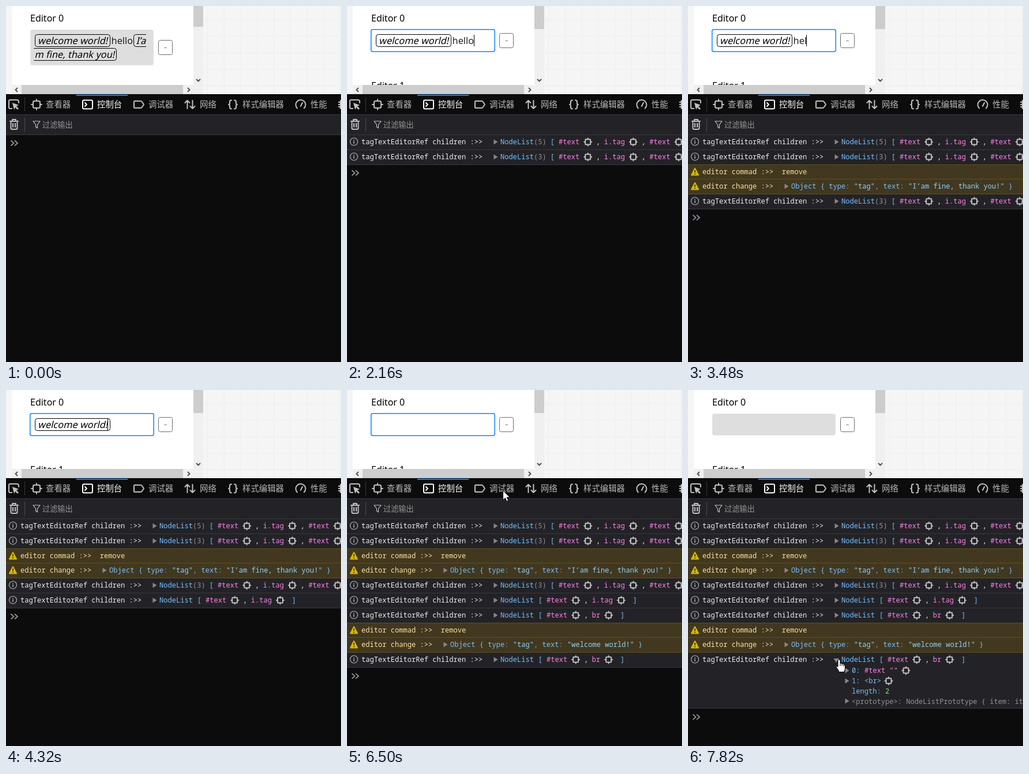
These frames come from a looping animation (581x618 px, 8 s). An HTML page:

```html
<!DOCTYPE html>
<html lang="zh">
<head>
<meta charset="utf-8">
<title>Tag editor and console</title>
<style>
  html, body { margin: 0; width: 100%; height: 100%; overflow: hidden; background: #0c0c0d; }
  svg { display: block; width: 581px; height: 618px; }
  text { white-space: pre; font-family: "Noto Sans", "Open Sans", sans-serif; font-size: 16.4px; }
  .label { font-size: 16px; }
  .cjk { font-family: "Noto Sans CJK SC", "Noto Sans CJK", sans-serif; font-size: 14.4px; }
  .filter { font-size: 13.2px; }
  .mono { font-family: "Noto Sans Mono", "DejaVu Sans Mono", monospace; font-size: 12.08px; font-weight: 500; }
  .icon { fill: none; stroke: #c0c0c3; stroke-width: 2; stroke-linejoin: round; stroke-linecap: round; }
  .active { stroke: #fff; }
  .thin { stroke-width: 1.2; }
  .tag { fill: none; stroke: #000; }
</style>
</head>
<body>
<svg id="stage" viewBox="0 0 581 618"></svg>
<script>
const LOOP = 8000, CHAR = 7.25;
const BLUE = '#75bfff', PINK = '#ff7de9', GREY = '#939395', LIGHT = '#ededf0', SAND = '#fce2a1', STRING = '#8fd0ff';

const escape = s => s.replace(/&/g, '&amp;').replace(/</g, '&lt;');
const text = (x, y, s, fill, cls = '') => `<text x="${x}" y="${y}" fill="${fill}" class="${cls}">${escape(s)}</text>`;
const rect = (x, y, w, h, fill, extra = '') => `<rect x="${x}" y="${y}" width="${w}" height="${h}" fill="${fill}" ${extra}/>`;
const path = (d, extra = 'class="icon"') => `<path d="${d}" ${extra}/>`;
const group = (id, body, extra = '') => `<g id="${id}" ${extra}>${body}</g>`;
const slanted = (x, y, s) => `<g transform="translate(${x} ${y}) skewX(-13)">${text(0, 0, s, '#000')}</g>`;

// ---------- web page ----------
function gridLines() {
  let d = '';
  for (let x = 349.5; x < 581; x += 28.8) d += `M${x} 0V153`;
  for (let y = 23.5; y < 153; y += 28.8) d += `M342 ${y}H581`;
  return path(d, 'stroke="#eeeeee"');
}

function page() {
  const chevron = 'fill="none" stroke="#505050" stroke-width="2"';
  return rect(0, 0, 581, 153, '#f5f5f5') + gridLines() + rect(10, 0, 315, 137, '#fff')
    + text(42, 27, 'Editor 0', '#000', 'label')
    + group('nextLabel', text(42, 144, 'Editor 1', '#000', 'label'), 'clip-path="url(#panel)"')
    + rect(42, 41, 214, 62, '#dedede', 'id="editor" rx="3"')
    + group('button', rect(264.5, -12.5, 24, 25, '#fff', 'rx="3" stroke="#6b6b6b"') + path('M274.5 .5H279', 'stroke="#777"'))
    + group('firstTag', rect(50.5, 49.5, 130, 21, 'none', 'class="tag" rx="4"') + slanted(55, 66, 'welcome world!'))
    + '<text id="plain" x="182.5" y="66" fill="#222"></text>'
    + group('secondTag', path('M243 49.5H225.5Q221.5 49.5 221.5 53.5V66.5Q221.5 70.5 225.5 70.5H243', 'class="tag"')
      + path('M48 73.5H187.5Q191.5 73.5 191.5 77.5V90.5Q191.5 94.5 187.5 94.5H48', 'class="tag"')
      + slanted(225.5, 66, 'I’a') + slanted(49.5, 90, 'm fine, thank you!'))
    + rect(0, 0, 1, 20, '#000', 'id="caret"')
    + rect(325, 0, 17, 153, '#f0f0f0') + rect(325, 0, 17, 36, '#cdcdcd', 'id="thumb"')
    + rect(10, 137, 315, 16, '#f0f0f0') + rect(27, 137, 280, 16, '#cdcdcd')
    + path('M330 127L333.5 130.5L337 127M20 142L16.5 145.5L20 149M315 142L318.5 145.5L315 149', chevron);
}

// ---------- developer tools ----------
const nodeIcon = (x, y) => `<g transform="translate(${x} ${y})">`
  + rect(-4.5, -4.5, 9, 9, 'none', 'class="icon" rx="1"')
  + path('M0-6.5V-5M0 6.5V5M-6.5 0H-5M6.5 0H5') + '</g>';

function toolbar() {
  const tabs = [[69, '查看器'], [158, '控制台'], [247, '调试器'], [336, '网络'], [410, '样式编辑器'], [528, '性能']];
  return rect(0, 153, 581, 465, '#0c0c0d') + rect(0, 189, 581, 34, '#232327')
    + path('M0 188.5H581M0 223.5H581M32.5 159V183', 'stroke="#38383d"')
    + path('M32.5 194V218', 'stroke="#4a4a4f"')
    + rect(122, 154, 89, 2, '#0a84ff')
    + tabs.map(([x, s]) => text(x, 176, s, x === 158 ? '#fff' : '#b8b8bb', 'cjk')).join('')
    + path('M10 178H7Q5 178 5 176V165Q5 163 7 163H19Q22 163 22 166V168')
    + path('M11 168L22 172L18 174L22 178L20 180L16 176L14 180Z', 'fill="#c0c0c3"')
    + rect(47, 165, 12, 12, 'none', 'class="icon" rx="2"') + path('M53 162V165M53 177V180M44 171H47M59 171H62')
    + rect(133, 163.5, 17, 15, 'none', 'class="icon active" rx="2"') + path('M137 168L140 171L137 174', 'class="icon active"')
    + path('M223 165H233Q235 165 236 166.5L239 171L236 175.5Q235 177 233 177H223Q222 177 222 176V166Q222 165 223 165Z')
    + path('M314.5 178V164M310.5 168L314.5 164L318.5 168M323.5 164V178M319.5 174L323.5 178L327.5 174')
    + path('M391 163.5Q388 163.5 388 166V168.5Q388 171 386 171Q388 171 388 173.5V176Q388 178.5 391 178.5M396 163.5Q399 163.5 399 166V168.5Q399 171 401 171Q399 171 399 173.5V176Q399 178.5 396 178.5')
    + path('M505 177.5A8.5 8.5 0 1 1 517 177.5M511 174L514 168')
    + path('M577 167H581M577 171H581M577 175H581M580 164V178')
    + path('M7 200H21M11 199V197H17V199M8.5 202V212Q8.5 214 10.5 214H17.5Q19.5 214 19.5 212V202M12 204V210M16 204V210')
    + path('M47 200H59L54.5 206V212L51.5 210V206Z', 'class="icon thin"')
    + text(63, 211, '过滤输出', '#939395', 'cjk filter');
}

const rowTop = i => Math.round(223 + 25.8 * i);
const mono = (x, s, fill, y = 17) => text(x, y, s, fill, 'mono');
const closedArrow = (x, y) => path(`M${x} ${y - 4.5}L${x + 7} ${y}L${x} ${y + 4.5}Z`, 'fill="#87878b"');

function nodeList(count, ...nodes) {
  let x = count ? 367 : 346;
  let out = mono(25, 'tagTextEditorRef children :>>', LIGHT) + mono(266, 'NodeList', BLUE) + mono(x - 2 * CHAR, '[', BLUE);
  if (count) out += mono(324, `(${count})`, GREY);
  nodes.forEach((name, i) => {
    const icon = x + name.length * CHAR + 14.5;
    out += mono(x, name, PINK) + nodeIcon(icon, 13);
    if (i < nodes.length - 1) out += mono(icon + 14.2, ',', LIGHT);
    else if (!count) out += mono(icon + 20.5, ']', BLUE);
    x = icon + 28;
  });
  return { body: out, arrow: 254.5 };
}

const command = () => ({ warn: true, body: mono(25, 'editor commad :>>  remove', SAND) });

function change(value) {
  let x = 179;
  const parts = [['Object { ', BLUE], ['type', BLUE], [': ', GREY], ['"tag"', STRING], [', ', GREY],
    ['text', BLUE], [': ', GREY], [`"${value}"`, STRING], [' }', BLUE]];
  const body = parts.map(([s, fill]) => {
    const out = mono(x, s, fill);
    x += s.length * CHAR;
    return out;
  }).join('');
  return { warn: true, arrow: 167.5, body: mono(25, 'editor change :>>', SAND) + body };
}

const rows = [
  [1200, nodeList(5, '#text', 'i.tag', '#text')],
  [2160, nodeList(3, '#text', 'i.tag', '#text')],
  [2280, command()],
  [2280, change('I’am fine, thank you!')],
  [2340, nodeList(3, '#text', 'i.tag', '#text')],
  [4320, nodeList(0, '#text', 'i.tag')],
  [4920, nodeList(0, '#text', 'br')],
  [4980, command()],
  [4980, change('welcome world!')],
  [5040, nodeList(0, '#text', 'br')]
];

function logRow([, row], i) {
  const height = rowTop(i + 1) - rowTop(i);
  const icon = row.warn
    ? path('M12 7L18 18.5H6Z', 'fill="#d7b600" stroke="#d7b600" stroke-width="2" stroke-linejoin="round"') + path('M12 10V14M12 15.5V17.5', 'stroke="#42381f" stroke-width="1.8"')
    : '<circle cx="12" cy="12.5" r="6.5" fill="none" stroke="#b1b1b3" stroke-width="1.2"/>' + path('M12 9V10.5M12 11.5V16', 'stroke="#b1b1b3" stroke-width="1.5"');
  const border = row.warn ? '#5d4f24' : '#38383d';
  const topBorder = row.warn ? rect(0, 0, 581, 1, border) : '';
  return group('row' + i, rect(0, 1, 581, height, row.warn ? '#42381f' : '#232327')
    + topBorder + rect(0, height, 581, 1, border) + icon + row.body
    + (row.arrow ? `<g class="arrow">${closedArrow(row.arrow, 13)}</g>` : ''), `transform="translate(0 ${rowTop(i)})"`);
}

const details = () => rect(0, 481, 581, 71, '#232327') + rect(0, 552, 581, 1, '#38383d')
  + path('M252.5 466H262L257 473Z', 'fill="#87878b"')
  + [487, 505, 540].map(y => closedArrow(272.5, y)).join('')
  + mono(284, '0:', BLUE, 491) + mono(306, '#text ""', PINK, 491) + nodeIcon(378, 487)
  + mono(284, '1:', BLUE, 509) + mono(306, '<br>', BLUE, 509) + nodeIcon(348, 505)
  + mono(284, 'length:', BLUE, 527) + mono(342, '2', '#86de74', 527)
  + mono(284, '<prototype>: NodeListPrototype { item: item() }', GREY, 544.5);

// ---------- pointer ----------
const cursors = () =>
  group('beam', path('M-4-8.5H-1Q0-8.5 0-7.5Q0-8.5 1-8.5H4M0-8V8M-4 8.5H-1Q0 8.5 0 7.5Q0 8.5 1 8.5H4', 'fill="none" stroke="#000" stroke-width="1.8"'))
  + group('arrow', path('M0 0V16L3.8 12.6L6.3 18.5L9 17.4L6.5 11.5H11.5Z', 'fill="#fff" stroke="#000" stroke-width=".8"'))
  + group('hand', path('M-2 1Q0-1.5 2 1V7Q4 5.5 5 7.5Q7 6.5 8 8.5Q10.5 8 10.5 11V15Q10.5 18 8.5 21.5H0Q-1 18-5 13Q-5.5 10.5-2 12.5Z', 'fill="#fff" stroke="#000"') + path('M2 7V11M5 8V11M8 9V12', 'stroke="#000"'));

const pointerTracks = [
  [[120, 528, 556], [420, 400, 330], [660, 250, 130], [840, 222, 84], [2160, 222, 84]],
  [[6380, 222, 84], [6560, 295, 220], [6800, 27, 400], [7040, 239, 456], [7220, 250, 462], [7340, 262, 468], [LOOP, 262, 468]]
];

function pointerAt(t) {
  const track = pointerTracks.find(k => t >= k[0][0] && t < k[k.length - 1][0]);
  if (!track) return null;
  const start = track[0][0], time = start + Math.floor((t - start) / 60) * 60;
  const i = track.findIndex((k, n) => n && time < k[0]);
  const [t0, x0, y0] = track[i - 1], [t1, x1, y1] = track[i], k = (time - t0) / (t1 - t0);
  return [x0 + (x1 - x0) * k, y0 + (y1 - y0) * k];
}

const stage = document.getElementById('stage');
stage.innerHTML = '<clipPath id="panel"><rect x="10" y="0" width="315" height="137"/></clipPath>'
  + page() + toolbar() + rows.map(logRow).join('') + group('details', details())
  + group('prompt', path('M8.5-4.5L13.5 0L8.5 4.5M15-4.5L20 0L15 4.5', 'fill="none" stroke="#939395" stroke-width="1.8"'))
  + group('pointer', cursors()) + '<circle id="click" r="12" fill="#ffe135" opacity=".56"/>';

const $ = id => document.getElementById(id);
const show = (node, on) => node.setAttribute('visibility', on ? 'inherit' : 'hidden');
const set = (node, attrs) => Object.entries(attrs).forEach(([k, v]) => node.setAttribute(k, v));
const move = (id, x, y) => $(id).setAttribute('transform', `translate(${x} ${y})`);
const within = (t, ...spans) => spans.some(([a, b]) => t >= a && t < b);

// [time, remaining text, caret x]
const typing = [[0, 'hello', 188], [2160, 'hello', 220], [3180, 'hell', 210], [3480, 'hel', 205],
  [3660, 'he', 201], [3840, 'h', 192], [4260, '', 176], [4920, '', 49]];

function drawEditor(t) {
  const tall = t < 2160, focused = within(t, [1080, 7640]), active = within(t, [1020, 7640]);
  const height = tall ? 62 : 38;
  if (focused) {
    const stroke = t < 1140 ? '#8fc3f5' : '#0a84ff';
    set($('editor'), { x: 41.75, y: 40.75, width: 214.5, height: height + .5, stroke, 'stroke-width': 1.5 });
  } else {
    set($('editor'), { x: 42.5, y: 41.5, width: 213, height: height - 1, stroke: '#e3e3e3', 'stroke-width': 1 });
  }
  $('editor').setAttribute('fill', active ? '#fff' : '#dedede');
  $('thumb').setAttribute('height', tall ? 36 : 40);
  move('button', 0, tall ? 72 : 60);
  show($('nextLabel'), !tall);
  show($('secondTag'), tall);
  show($('firstTag'), t < 4920);
  const [, plain, caretX] = typing.filter(k => t >= k[0]).pop();
  $('plain').textContent = plain;
  set($('caret'), { x: caretX, y: tall ? 74 : 50 });
  show($('caret'), within(t, [1020, 2640], [3120, 4740], [4920, 5420], [5900, 6380], [6860, 7340]));
}

function drawConsole(t) {
  const open = t >= 7700;
  const count = rows.filter(([time]) => t >= time).length;
  rows.forEach((_, i) => show($('row' + i), i < count));
  show($('row9').querySelector('.arrow'), count > 9 && !open);
  show($('details'), open);
  move('prompt', 0, 238 + 25.87 * count + (open ? 71 : 0));
}

function drawPointer(t) {
  const at = pointerAt(t);
  show($('pointer'), at);
  show($('click'), at && within(t, [1020, 1260], [7640, 7820]));
  if (!at) return;
  const [x, y] = at;
  const kind = t >= 7340 ? 'hand' : x < 256 && y < 103 ? 'beam' : 'arrow';
  for (const id of ['beam', 'arrow', 'hand']) show($(id), id === kind);
  move('pointer', x, y);
  set($('click'), { cx: x, cy: y });
}

function frame() {
  const t = performance.now() % LOOP;
  drawEditor(t);
  drawConsole(t);
  drawPointer(t);
  requestAnimationFrame(frame);
}
frame();
</script>
</body>
</html>
```
